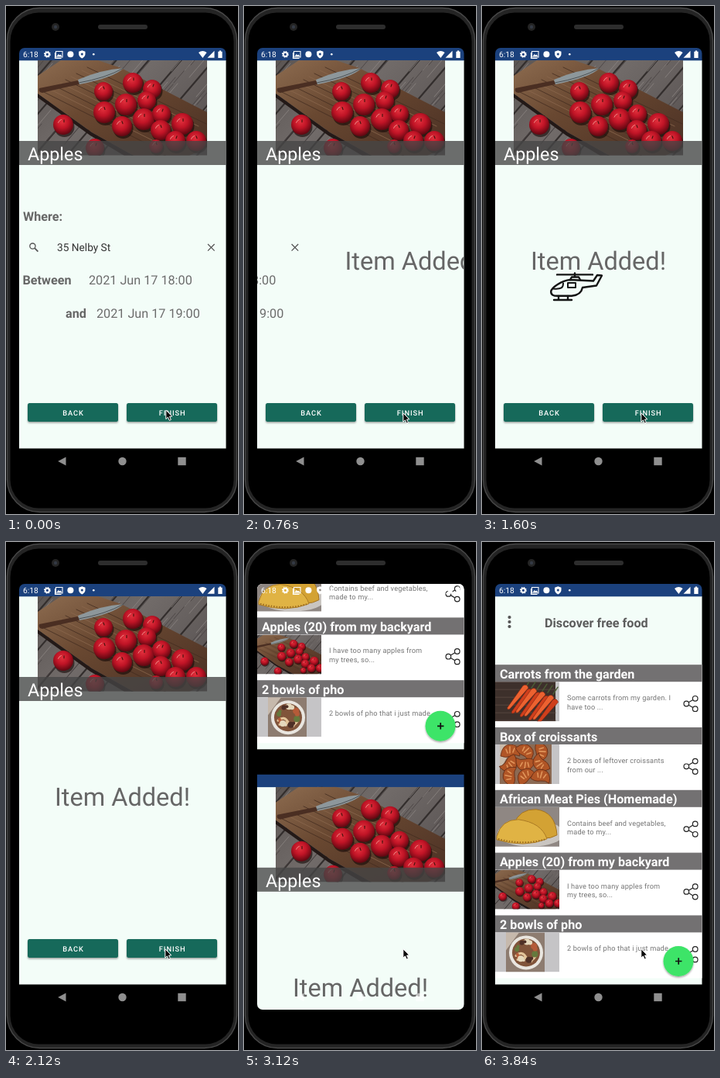
An HTML page that plays this animation: 300x655 px, repeating every 3880 ms.

```html
<!DOCTYPE html>
<html lang="en">
<head>
<meta charset="utf-8">
<title>Adding an item</title>
<style>
html, body { margin: 0; width: 100%; height: 100%; overflow: hidden; background: #000; }
svg { display: block; width: 300px; height: 655px; font-family: Roboto, sans-serif; text-rendering: geometricPrecision; }
.bold { font-weight: 700; font-size: 16.2px; }
.grey { fill: #666; }
.date { font-size: 16.2px; fill: #6c6c6c; }
.note { font-size: 9.2px; letter-spacing: .17px; fill: #757575; }
.btn { font-size: 9.3px; font-weight: 500; letter-spacing: .95px; fill: #fff; text-anchor: middle; }
</style>
</head>
<body>
<svg viewBox="0 0 300 655" xmlns="http://www.w3.org/2000/svg">
  <defs>
    <clipPath id="screen"><rect x="17" y="54" width="267.5" height="549" rx="7"/></clipPath>
    <clipPath id="photoBox"><rect width="219" height="122.5"/></clipPath>
    <clipPath id="thumbBox"><rect width="83" height="51"/></clipPath>
    <radialGradient id="red" cx=".45" cy=".36" r=".62">
      <stop offset="0" stop-color="#e2303c"/><stop offset=".5" stop-color="#c01426"/><stop offset="1" stop-color="#640812"/>
    </radialGradient>
    <linearGradient id="board" x1="0" y1="0" x2="1" y2="1">
      <stop offset="0" stop-color="#8d6c50"/><stop offset=".4" stop-color="#694831"/><stop offset="1" stop-color="#4a3024"/>
    </linearGradient>
    <linearGradient id="planks" x1="0" y1="0" x2="1" y2=".6">
      <stop offset="0" stop-color="#5b5553"/><stop offset=".5" stop-color="#716b69"/><stop offset="1" stop-color="#5c5655"/>
    </linearGradient>
    <filter id="soft" x="-30%" y="-30%" width="160%" height="170%">
      <feDropShadow dx="0" dy="1.5" stdDeviation="1.3" flood-opacity=".38"/>
    </filter>
    <g id="photo" clip-path="url(#photoBox)"></g>
  </defs>

  <rect width="300" height="655" fill="#000"/>
  <rect x="1.5" y="2.5" width="297" height="650" rx="42" fill="#242424" stroke="#484848" stroke-width="1.4"/>
  <rect x="5.5" y="8.5" width="289" height="639" rx="37" fill="#000"/>
  <circle cx="64" cy="27" r="5" fill="#242424"/>
  <circle cx="64" cy="27" r="2.2" fill="#343a44"/>
  <rect x="119" y="24" width="64" height="6" rx="3" fill="#2d2d2d"/>

  <g clip-path="url(#screen)">
    <g id="home"></g>
    <g id="form">
      <rect x="17" y="54" width="268" height="549"/>
      <rect x="17" y="70" width="268" height="500.5" fill="#f3fdf8"/>
      <rect x="17" y="54" width="268" height="16.3" fill="#1b417d"/>
      <use href="#photo" x="41" y="70"/>
      <rect x="17" y="174" width="268" height="31" fill="#464646" fill-opacity=".78"/>
      <text x="28" y="199" font-size="23.3" fill="#fff">Apples</text>
      <g id="entry">
        <g class="bold grey">
          <text x="22" y="277">Where:</text>
          <text x="21.5" y="358.5">Between</text>
          <text x="77" y="402">and</text>
        </g>
        <g fill="none" stroke="#555" stroke-width="1.3">
          <circle cx="34.4" cy="309.6" r="3.6"/>
          <path d="M37 312.2l4.4 4.4" stroke-width="1.7"/>
          <path d="M261 307l8.6 8.6m0-8.6l-8.6 8.6"/>
        </g>
        <text x="66" y="316.3" font-size="13.7" fill="#333">35 Nelby St</text>
        <text class="date" x="107" y="358.5">2021 Jun 17 18:00</text>
        <text class="date" x="117" y="402">2021 Jun 17 19:00</text>
      </g>
      <g id="done">
        <text class="grey" x="150.5" y="340" font-size="32.5" text-anchor="middle">Item Added!</text>
        <g id="heli" fill="none" stroke="#141414" stroke-width="2.4" stroke-linejoin="round" stroke-linecap="round">
          <path d="M9 3.4H55M32 1.5V6M26 10L28 6.5H37L39 10"/>
          <path d="M26 10C15 11 2 20 1.2 25C1 30 5 30.8 9 30.8H28C37 30 41 25 42 20L60 17.5L67 4.5L61 4L56 11.5Z"/>
          <path d="M17 14.5C17 20 15 22.5 4 21.5M23 14H33V20H23Z" stroke-width="2"/>
          <path d="M11 31V35M23 31V35M5 36H28"/>
        </g>
      </g>
      <g filter="url(#soft)" fill="#19695a">
        <rect x="28" y="512" width="117" height="24" rx="2.5"/>
        <rect x="156" y="512" width="117" height="24" rx="2.5"/>
      </g>
      <text class="btn" x="87" y="528">BACK</text>
      <text class="btn" x="215.2" y="528">FINISH</text>
    </g>

    <g fill="#fff">
      <text x="22" y="66" font-size="10.2">6:18</text>
      <circle cx="53.4" cy="62.3" r="2.6" fill="none" stroke="#fff" stroke-width="2"/>
      <circle cx="53.4" cy="62.3" r="3.8" fill="none" stroke="#fff" stroke-width="1.3" stroke-dasharray="1.5 1.48"/>
      <path d="M64.5 58.5h8.5v7.5h-8.500zM63.500 60v7.500h8" fill="none" stroke="#fff" stroke-width="1.1"/>
      <path d="M65.500 65l2.200-3 1.600 1.600 1.200-1.200 1.800 2.600z"/>
      <circle cx="83.4" cy="62.3" r="4"/>
      <path fill-rule="evenodd" d="M98.3 57.2l4.2 1.6v3.4q-.5 3.6-4.2 5.2q-3.7-1.6-4.2-5.2v-3.4zM98.3 60.3l-1.8 1.8 1.8 1.9 1.8-1.9z"/>
      <circle cx="113.3" cy="62.3" r="1.3"/>
      <path d="M249 60q5.3-4 10.6 0l-5.3 7z"/>
      <path d="M269.5 57.8v9h-9z"/>
      <path d="M274.3 58.8h1.5v-1.2h2.3v1.2h1.5v8.2h-5.3z"/>
    </g>
    <g fill="#fff" fill-opacity=".56">
      <path d="M77.5 581.5v11l-10.3-5.5z"/>
      <circle cx="150.5" cy="587" r="5.2"/>
      <rect x="222.3" y="581.8" width="10.4" height="10.4"/>
    </g>
  </g>
  <path id="cursor" d="M0 0V11.5L2.6 9.2L4.5 13.4L6.6 12.4L4.7 8.4L8 8.1Z" fill="#0b0b0b" stroke="#fff" stroke-width="1"/>
</svg>
<script>
const LOOP = 3880, STEP = 40, PAGE_W = 267, PAGE_H = 549;
const el = id => document.getElementById(id);
const unit = (t, start, dur) => Math.min(1, Math.max(0, (t - start) / dur));
const shift = (id, x, y) => el(id).setAttribute('transform', `translate(${x.toFixed(2)} ${y.toFixed(2)})`);
const range = n => [...Array(n).keys()];
const dot = (x, y, r, fill) => `<circle cx="${x}" cy="${y}" r="${r}" fill="${fill}"/>`;
const line = (d, stroke, w) => `<path d="${d}" fill="none" stroke="${stroke}" stroke-width="${w}" stroke-linecap="round"/>`;

let seed = 7;
const rnd = () => (seed = seed * 16807 % 2147483647) / 2147483647;

function applePhoto() {
  const apples = [[85, 40, 12], [123, 29, 13], [148, 37, 12], [86, 67, 14], [114, 57, 14], [141, 52, 12],
    [109, 85, 13], [137, 76, 14], [160, 69, 12], [159, 90, 13], [187, 82, 14], [178, 104, 13],
    [205, 104, 13], [33, 83, 13], [74, 113, 12], [153, 111, 9]];
  const seams = range(8).map(i => line(`M${i * 42 - 90} 125L${i * 42 + 20} -3`, '#332e2d', 2.2)).join('');
  const grain = range(60).map(() => {
    const x = rnd() * 240 - 20, y = rnd() * 120;
    return line(`M${x | 0} ${y | 0}l24 -28`, rnd() > .5 ? '#8c8683' : '#474140', .8);
  }).join('');
  const boardGrain = range(9).map(i =>
    line(`M${8 + i * 7} ${41 - i * 4}l${130 + i * 3} ${65 + i}`, i % 2 ? '#8b684d' : '#432c20', .8)).join('');
  const fruit = apples.map(([x, y, r], i) =>
    dot(x + 1.5, y + 3, r, 'rgba(20,8,6,.6)') + dot(x, y, r, 'url(#red)') +
    line(`M${x + 1} ${y - r * .25}l${i % 3 - 1} -3`, '#4a130f', 1.2) +
    line(`M${x - r * .5} ${y - r * .2}q1 -3 4 -4`, '#ee8a86', 1)).join('');
  return `<rect width="219" height="123" fill="url(#planks)"/>${seams}${grain}
    <path d="M0 20L30 0H78L108 10L219 67V112L196 123H124L70 93L0 43Z" fill="url(#board)"/>${boardGrain}
    <path d="M124 123L70 93L0 43V48L68 97L112 123Z" fill="#231917"/>
    <path d="M2 36L52 26L54 31Q25 37 6 42Q0 41 2 36Z" fill="#4a2e22"/>
    <path d="M52 25Q82 12 111 10Q100 22 54 31Z" fill="#8d979b"/>
    <path d="M53 29Q88 23 111 10" fill="none" stroke="#4c5154"/>${fruit}`;
}

function carrots() {
  const roots = range(8).map(i => {
    const x = 36 + i * 5.5, y = 5 + i * 2.2 + i % 2 * 3;
    return `<path d="M${x} ${y}q5 -3 7 3L${x - 17} ${y + 30}q-4 2 -3 -2Z" fill="${i % 2 ? '#cf3f1c' : '#ec6230'}" stroke="#7c2412" stroke-width=".6"/>`;
  }).join('');
  return `<rect width="78" height="51" fill="#3d302b"/>` +
    range(6).map(i => line(`M0 ${i * 10}H78`, '#54453d', 1)).join('') +
    range(6).map(i => line(`M${40 + i * 7} ${6 + i * 2}l6 -9`, '#4b5d35', 1.5)).join('') + roots;
}

function croissants() {
  return '<rect x="6" width="67" height="51" fill="#8b6a54"/><path d="M6 0H25L9 28H6Z" fill="#c9bbab"/>' +
    range(9).map(i => {
      const x = 19 + i % 3 * 20, y = 9 + (i / 3 | 0) * 16;
      return `<g transform="translate(${x} ${y}) rotate(${i * 47})">` +
        '<path d="M-12 6Q-10 -9 1 -9T13 6Q7 3 1 6T-12 6Z" fill="#b05526" stroke="#642c15" stroke-width=".8"/>' +
        line('M-5 -3l2 5M0 -6v8M6 -4l-2 5', '#e0955a', 1.6) + '</g>';
    }).join('');
}

const pies = () => `<rect width="83" height="51" fill="#8f8783"/><ellipse cx="46" cy="34" rx="43" ry="17" fill="#c9c5c1"/>
  <path d="M24 22Q32 2 53 3Q78 6 80 36Q64 46 38 33Z" fill="#d3a234" stroke="#a37322"/>
  <path d="M2 38Q8 16 30 16Q60 20 67 41Q38 53 2 42Z" fill="#e0b344" stroke="#aa7a24"/>
  <path d="M4 41Q38 50 66 41" fill="none" stroke="#9a691e" stroke-width="2" stroke-dasharray="1.5 2"/>`;

const pho = () => '<rect x="14" width="50" height="51" fill="#8d7c70"/><path d="M14 0H31L14 23Z" fill="#c6b9ac"/>' +
  dot(40, 26, 22, '#e9e6e0') + dot(40, 26, 18, '#80543a') +
  line('M27 30q8 -7 13 2t12 -1M29 35q10 -5 18 2', '#e3c49a', 3) +
  range(16).map(i => dot(40 + 12 * Math.cos(i * 2.4), 24 + 12 * Math.sin(i * 2.4), 2 + i % 3,
    ['#65793d', '#b55b38', '#e5d8bc', '#4e3026'][i % 4])).join('');

const apples = () => '<svg width="83" height="51" viewBox="0 0 219 122.5" preserveAspectRatio="xMidYMid slice" style="width:83px;height:51px"><use href="#photo"/></svg>';

const rows = [
  ['Carrots from the garden', ['Some carrots from my garden. I', 'have too ...'], carrots],
  ['Box of croissants', ['2 boxes of leftover croissants', 'from our ...'], croissants],
  ['African Meat Pies (Homemade)', ['Contains beef and vegetables,', 'made to my...'], pies],
  ['Apples (20) from my backyard', ['I have too many apples from', 'my trees, so...'], apples],
  ['2 bowls of pho', ['2 bowls of pho that i just made'], pho]
];

const share = `<g fill="none" stroke="#222" stroke-width="1.2">
  <circle cx="264.3" cy="50.3" r="3.3"/><circle cx="275.7" cy="43.6" r="3.3"/><circle cx="275.7" cy="57" r="3.3"/>
  <path d="M267.2 48.6l5.6-3.3M267.2 52l5.6 3.3"/></g>`;

const rowMarkup = ([title, notes, art], i) => `<g transform="translate(0 ${158.2 + i * 80.8})">
  <rect x="17" width="268" height="81" fill="#fff"/>
  <rect x="17" width="268" height="22" fill="#737172"/>
  <text class="bold" x="23" y="17.5" fill="#fff">${title}</text>
  <g transform="translate(17 22)" clip-path="url(#thumbBox)"><rect width="83" height="51" fill="#c5c4c6"/>${art()}</g>
  ${notes.map((s, k) => `<text class="note" x="110" y="${46 + k * 11.5}">${s}</text>`).join('')}${share}</g>`;

el('photo').innerHTML = applePhoto();
el('home').innerHTML = `<rect x="17" y="54" width="268" height="549"/>
  <rect x="17" y="70" width="268" height="500.5" fill="#f3fdf8"/>
  <rect x="17" y="54" width="268" height="16.3" fill="#1b417d"/>
  ${[97, 103, 109].map(y => dot(35.5, y, 2.1, '#555')).join('')}
  <text class="bold" x="81" y="109.5" fill="#5c5c5c">Discover free food</text>
  ${rows.map(rowMarkup).join('')}
  <circle cx="254" cy="540.5" r="19.5" fill="#3ee468" filter="url(#soft)"/>
  <path d="M250 540.5h8.4M254.2 536.3v8.4" stroke="#111" stroke-width="1.7"/>`;

function draw(t) {
  const swipe = 1 - (1 - unit(t, 613, 400)) ** 3;
  shift('entry', -PAGE_W * swipe, 0);
  shift('done', PAGE_W * (1 - swipe), 0);
  shift('heli', 88 - (t - 1600) * .327, 343);

  const drop = PAGE_H * (.5 - .5 * Math.cos(Math.PI * unit(t, 2896, 480)));
  shift('form', 0, drop);
  shift('home', 0, drop - PAGE_H);

  const move = unit(t, 80, 320);
  shift('cursor', 206.8 - move, 521 + 3.7 * move);
}

// The screen refreshes 25 times a second.
const begin = performance.now();
function tick() {
  const t = (performance.now() - begin) % LOOP;
  draw(Math.floor((t + 2) / STEP) * STEP % LOOP);
  requestAnimationFrame(tick);
}
tick();
</script>
</body>
</html>
```
